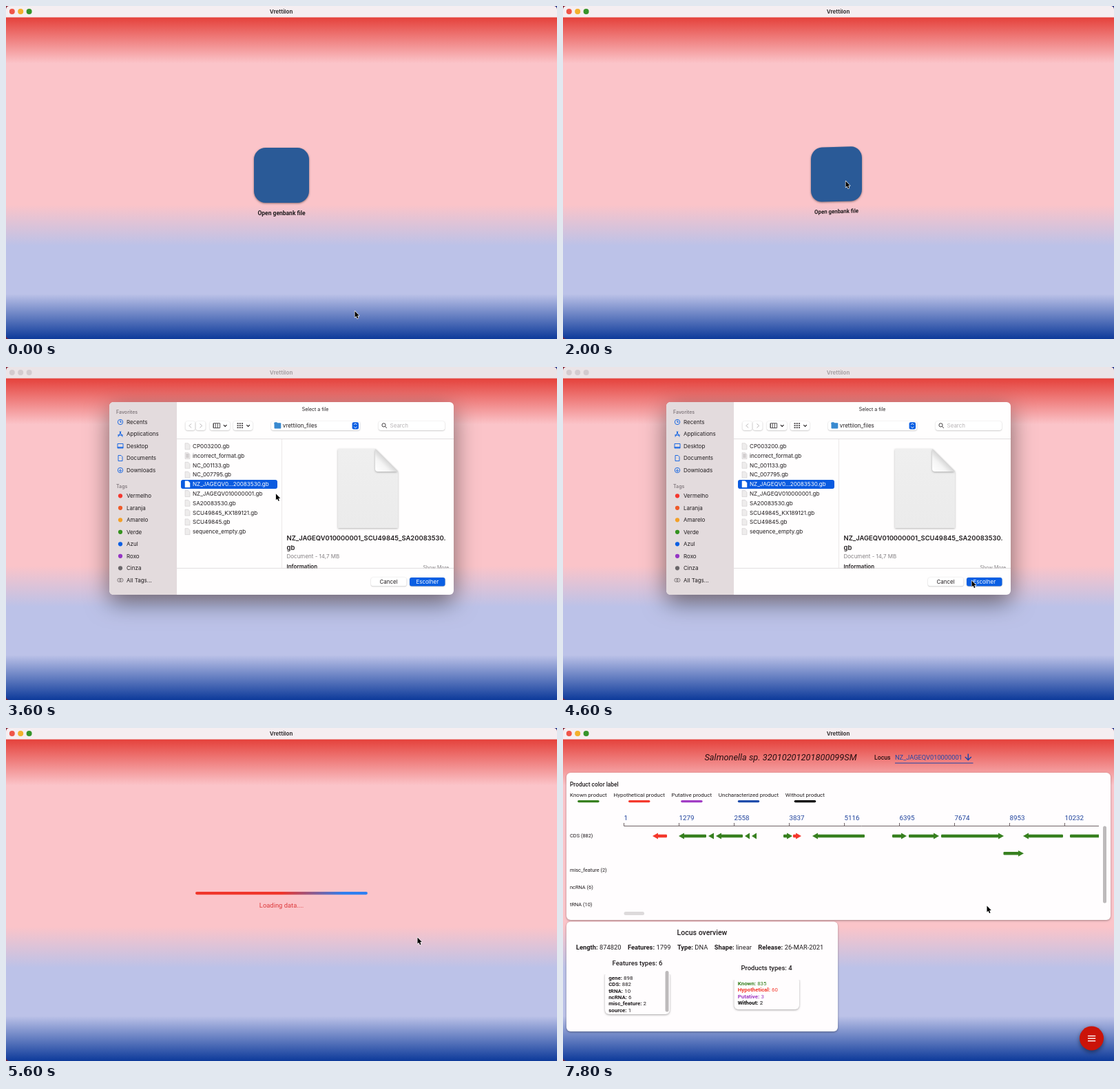
Write an HTML page with a canvas that moves like this. It is 800 px wide and 484 px high and loops after 8000 ms.

```html
<!DOCTYPE html>
<html lang="en">
<head>
<meta charset="utf-8">
<title>Vrettilon</title>
<style>
html, body { margin: 0; width: 100%; height: 100%; overflow: hidden; }
canvas { display: block; }
</style>
</head>
<body>
<canvas id="stage" width="800" height="484"></canvas>
<script>
const ctx = document.getElementById('stage').getContext('2d');
const LOOP = 8000, STEP = 200;
const SANS = 'Inter, sans-serif', ROBOTO = 'Roboto, sans-serif';
const RED = '#f4382c', GREEN = '#37801f', PURPLE = '#a13cc4', BLUE = '#1f4cab';
const INK = '#201c1e', ACCENT = '#0a5fe3', PAPER = '#fffdfe', BAR = '#bdbabb';

// ---- helpers ----
function text(s, x, y, size, color = INK, weight = 400, align = 'left', family = SANS) {
  ctx.font = `${weight} ${size}px ${family}`;
  ctx.fillStyle = color;
  ctx.textAlign = align;
  ctx.fillText(s, x, y + size * 0.36);
  return ctx.measureText(s).width;
}
const rob = (s, x, y, size, color, weight, align) => text(s, x, y, size, color, weight, align, ROBOTO);

// Bold label followed by its value; returns the total width.
function pair(label, value, x, y, size, color) {
  const w = rob(label + ':', x, y, size, color, 700) + size * 0.27;
  return w + rob(value, x + w, y, size, color);
}
function box(x, y, w, h, r, fill) {
  ctx.beginPath();
  ctx.roundRect(x, y, w, h, r);
  ctx.fillStyle = fill;
  ctx.fill();
}
function shadow(blur, dy, alpha, paint) {
  ctx.save();
  ctx.shadowColor = `rgba(0,0,0,${alpha})`;
  ctx.shadowBlur = blur;
  ctx.shadowOffsetY = dy;
  paint();
  ctx.restore();
}
const card = (x, y, w, h) => shadow(3, 1, 0.35, () => box(x, y, w, h, 6, PAPER));
const dot = (x, y, r, fill) => box(x - r, y - r, 2 * r, 2 * r, r, fill);

function stroke(color, width = 0.9) {
  ctx.strokeStyle = color;
  ctx.lineWidth = width;
  ctx.stroke();
}
function line(x0, y0, x1, y1, color, width = 1) {
  ctx.beginPath();
  ctx.moveTo(x0, y0);
  ctx.lineTo(x1, y1);
  stroke(color, width);
}
function ring(x, y, r, color, width) {
  ctx.beginPath();
  ctx.arc(x, y, r, 0, 7);
  stroke(color, width);
}
// A "v" turned clockwise by quarter turns.
function chevron(x, y, size, turns, color, width = 1) {
  ctx.save();
  ctx.translate(x, y);
  ctx.rotate(turns * Math.PI / 2);
  ctx.beginPath();
  ctx.moveTo(-size, -size / 2);
  ctx.lineTo(0, size / 2);
  ctx.lineTo(size, -size / 2);
  stroke(color, width);
  ctx.restore();
}
function downArrow(x, y, size, color, width) {
  line(x, y - size, x, y + size, color, width);
  chevron(x, y + size / 2, size, 0, color, width);
}
// Sheet of paper with its top right corner cut off.
function sheet(x, y, w, h, fold) {
  ctx.beginPath();
  ctx.moveTo(x, y);
  ctx.lineTo(x + w - fold, y);
  ctx.lineTo(x + w, y + fold);
  ctx.lineTo(x + w, y + h);
  ctx.lineTo(x, y + h);
  ctx.closePath();
}
function gradient(x0, y0, x1, y1, stops) {
  const g = ctx.createLinearGradient(x0, y0, x1, y1);
  for (const [at, c] of stops) g.addColorStop(at, c);
  return g;
}
const smooth = (a, b, t) => {
  const k = Math.min(1, Math.max(0, (t - a) / (b - a)));
  return k * k * (3 - 2 * k);
};

// ---- window ----
const backdrop = gradient(0, 17, 0, 484, [
  [0, '#e5423c'], [0.142, '#fbc4c9'], [0.582, '#fbc4c9'],
  [0.71, '#bcc2e8'], [0.86, '#bcc2e8'], [1, '#0d3a9a']]);
const desk = gradient(0, 0, 800, 0, [[0, '#7c2438'], [1, '#1c3c94']]);

function windowFrame(active) {
  ctx.fillStyle = desk;
  ctx.fillRect(0, 0, 800, 484);
  box(0, 0, 800, 484, 5, backdrop);
  box(0, 0, 800, 16.5, [5, 5, 0, 0], active ? '#f5eef1' : '#ebe4e7');
  ['#ef5548', '#f3b02b', '#36942a'].forEach((c, i) => dot(8.8 + i * 12.4, 8, 4, active ? c : '#d3cbcf'));
  text('Vrettilon', 399.5, 8, 8, active ? '#393436' : '#a9a2a5', 700, 'center');
}

// ---- start page ----
function startPage(tilt) {
  ctx.save();
  ctx.translate(360, 206);
  ctx.transform(1 - 0.075 * tilt, -0.026 * tilt, 0, 1 - 0.012 * tilt, 0, 0);
  shadow(3, 1, 0.45, () => box(0, 0, 80, 80, 17, '#2a5a97'));
  rob('Open genbank file', 40, 94.5, 8.5, INK, 700, 'center');
  ctx.restore();
}

// ---- file dialog ----
const files = ['CP003200.gb', 'incorrect_format.gb', 'NC_001133.gb', 'NC_007795.gb',
  'NZ_JAGEQV0...20083530.gb', 'NZ_JAGEQV010000001.gb', 'SA20083530.gb',
  'SCU49845_KX189121.gb', 'SCU49845.gb', 'sequence_empty.gb'];
const places = ['Recents', 'Applications', 'Desktop', 'Documents', 'Downloads'];
const tags = { Vermelho: '#f5372f', Laranja: '#ee5a2a', Amarelo: '#f3a027', Verde: '#35921f',
  Azul: ACCENT, Roxo: '#9535c4', Cinza: '#6a676a' };

const placeIcons = {
  Recents(x, y) {
    ring(x, y, 3.7, ACCENT);
    line(x, y - 2.5, x, y + 0.5, ACCENT);
    line(x, y, x + 2, y, ACCENT);
  },
  Applications(x, y) {
    for (const s of [-1, 1]) line(x - s, y - 4, x + s * 3.2, y + 4, ACCENT);
    line(x - 4, y + 1.5, x + 4, y + 1.5, ACCENT);
  },
  Desktop(x, y) {
    sheet(x - 4, y - 3.5, 8, 6.5, 0);
    stroke(ACCENT);
    line(x - 4, y + 1.8, x + 4, y + 1.8, ACCENT, 1.4);
  },
  Documents(x, y) {
    sheet(x - 3, y - 4, 6, 8, 2);
    stroke(ACCENT);
  },
  Downloads(x, y) {
    ring(x, y, 3.7, ACCENT);
    downArrow(x, y, 2, ACCENT, 0.9);
  }
};
function sidebar(active) {
  box(150, 51, 98, 280, [6, 0, 0, 6], active ? '#e3dbdd' : '#e8e1e3');
  ctx.globalAlpha = active ? 1 : 0.8;
  text('Favorites', 160, 65.3, 7, '#857c80', 600);
  text('Tags', 160, 173, 7, '#857c80', 600);
  const rows = (names, top, icon) => names.forEach((s, i) => {
    const y = top + i * 17.5;
    ctx.globalAlpha = active ? 1 : 0.35;
    icon(s, y);
    ctx.globalAlpha = active ? 1 : 0.5;
    text(s, 175, y, 8);
  });
  rows(places, 80, (s, y) => placeIcons[s](166, y));
  rows(Object.keys(tags), 187.3, (s, y) => dot(166, y, 3.1, tags[s]));
  rows(['All Tags...'], 309.8, (s, y) => [164.4, 167.4].forEach(x => ring(x, y, 2.6, '#6b6568', 0.8)));
  ctx.globalAlpha = 1;
}
function control(x, y, w, h, fill = '#fff') {
  shadow(1.6, 0.5, 0.3, () => box(x, y, w, h, 3, fill));
}
function toolbar(active) {
  text('Select a file', 449, 61.3, 7, INK, 400, 'center');
  const y = 85.4;
  for (const [x, w] of [[260.5, 14], [275.7, 14], [296, 29], [330, 28], [385, 129], [541, 96]])
    control(x, 79, w, 13);
  chevron(267.5, y, 3, 1, '#b5b1b3');
  chevron(283, y, 3, 3, '#b5b1b3');
  for (const x of [318.2, 351.6]) chevron(x, y - 0.2, 2.3, 0, INK, 1.1);
  sheet(301.2, 81.8, 9.4, 6.8, 0);
  stroke('#3d393b');
  for (let i = 0; i < 3; i++) {
    line(301.2 + i * 3.1, 82, 301.2 + i * 3.1, 88.6, '#3d393b', 0.9);
    for (let j = 0; j < 3; j++) box(335.5 + i * 3.2, 81.3 + j * 3, 2.2, 1.8, 0.4, '#4a4648');
  }
  box(389.5, 80.3, 4.5, 3, 1, '#3f8fd0');
  box(389.5, 81.3, 9.8, 8.2, 1, '#3889d0');
  text('vrettilon_files', 401.8, y, 8);
  if (active) box(502.6, 80.2, 9.4, 10.2, 2.2, ACCENT);
  chevron(507.3, y - 2.4, 2.1, 2, active ? '#fff' : INK);
  chevron(507.3, y + 2.3, 2.1, 0, active ? '#fff' : INK);
  ring(548.5, 84.4, 2.6, '#3d393b', 1);
  line(550.4, 86.3, 552.8, 88.8, '#3d393b');
  text('Search', 557.5, y, 8, '#b8b4b6');
}
function fileList(selected) {
  files.forEach((s, i) => {
    const y = 115.3 + i * 13.76, on = selected && i === 4;
    if (on) box(254, 164, 140, 13, 3, '#0a5be0');
    sheet(260, y - 4.5, 7, 9, 2.5);
    ctx.fillStyle = on ? '#fff' : '#eeecec';
    ctx.fill();
    stroke(on ? '#fff' : '#c6c3c5', 0.5);
    if (i === 1) for (const d of [-2, 0, 2]) line(261.3, y + d, 265.6, y + d, '#8d898b', 0.6);
    text(s, 271, y, 8.08, on ? '#fff' : INK);
  });
}
function preview() {
  shadow(3, 1, 0.3, () => {
    sheet(482, 119, 87, 115, 33);
    ctx.fillStyle = gradient(0, 119, 0, 234, [[0, '#efefef'], [1, '#ebebeb']]);
    ctx.fill();
    ctx.beginPath();
    ctx.moveTo(536, 119);
    ctx.lineTo(569, 152);
    ctx.arcTo(536, 152, 536, 119, 4);
    ctx.closePath();
    ctx.fillStyle = gradient(537, 151, 553, 135, [[0, '#fff'], [0.6, '#f4f4f4'], [1, '#d4d4d4']]);
    ctx.fill();
  });
  text('NZ_JAGEQV010000001_SCU49845_SA20083530.', 407.5, 249, 9.45, INK, 600);
  text('gb', 407.5, 263, 9.45, INK, 600);
  text('Document - 14,7 MB', 407.5, 275.6, 8, '#858184');
  ctx.save();
  ctx.beginPath();
  ctx.rect(401, 280, 248, 12.5);
  ctx.clip();
  text('Information', 407.5, 290.6, 8, INK, 600);
  text('Show More', 643, 291, 7, '#858184', 400, 'right');
  ctx.restore();
}
function dialog(active, selected, detail) {
  shadow(active ? 34 : 14, active ? 11 : 4, active ? 0.5 : 0.22, () => box(150, 51, 500, 280, 6, '#fffefe'));
  sidebar(active);
  toolbar(active);
  for (const y of [104.5, 292.5]) line(248, y, 650, y, '#e2dfe0');
  line(400.5, 105, 400.5, 292, '#ebe8e9');
  fileList(selected);
  if (detail) preview();
  control(530, 306, 51.5, 12.4);
  text('Cancel', 555.5, 312, 8, INK, 400, 'center');
  if (selected) control(586, 306, 51.5, 12.4, ACCENT);
  text('Escolher', 611.8, 312, 8, selected ? '#fff' : '#bdbabb', 400, 'center');
}

// ---- loading ----
function loading() {
  box(275, 238, 250, 4.2, 2.1, gradient(275, 0, 525, 0,
    [[0, '#f0362b'], [0.5, '#f0362b'], [0.86, '#2f7fee'], [1, '#2f80f2']]));
  rob('Loading data....', 400, 257.8, 9.4, '#dd393b', 400, 'center');
}

// ---- genome page ----
const legend = { Known: GREEN, Hypothetical: RED, Putative: PURPLE, Uncharacterized: BLUE, Without: '#000' };

function gene(x, length, y, dir, color) {
  const head = Math.min(8, length), tip = dir > 0 ? x + length : x, neck = tip - dir * head;
  ctx.beginPath();
  ctx.moveTo(tip, y);
  ctx.lineTo(neck, y - 4.4);
  ctx.lineTo(neck, y + 4.4);
  ctx.fillStyle = color;
  ctx.fill();
  if (length > 9) box(dir > 0 ? x : neck - 0.5, y - 2.2, length - head + 0.5, 4.4, 1.2, color);
}
// Neighbouring genes on one strand, a small gap apart.
function operon(x, dir, lengths, color = GREEN, y = 157) {
  for (const n of lengths) {
    gene(x, n, y, dir, color);
    x += n + 3;
  }
}
function genes() {
  ctx.save();
  ctx.beginPath();
  ctx.rect(88, 143, 690, 120);
  ctx.clip();
  operon(130, -1, [21], RED);
  operon(168, -1, [40, 8, 39, 7, 7]);
  operon(320, 1, [13]);
  operon(334, 1, [12], RED);
  operon(362, -1, [76]);
  operon(478, 1, [21, 44, 91]);
  operon(639.5, 1, [29.5], GREEN, 182.3);
  operon(668, -1, [58]);
  operon(736, 1, [100]);
  ctx.restore();
}
function genomeTrack() {
  card(5, 65, 790, 214);
  rob('Product color label', 10, 81.5, 8.4, INK, 500);
  let x = 10;
  for (const name in legend) {
    const w = rob(name + ' product', x, 97.5, 8);
    box(x + w / 2 - 15.7, 105, 31.5, 3.2, 1.6, legend[name]);
    x += w + 9.8;
  }
  line(88.5, 142.5, 778, 142.5, '#6e6265');
  for (let i = 0; i < 9; i++) {
    const tick = 88.5 + i * 80;
    line(tick, 138, tick, 142.5, '#6e6265');
    rob(i * 1279 || 1, tick, 130, 9.8, '#1f429c');
  }
  genes();
  ['CDS (882)', '', 'misc_feature (2)', 'ncRNA (6)', 'tRNA (10)']
    .forEach((s, i) => rob(s, 10, 156.3 + i * 25, 7.4));
  box(784, 142.5, 5, 112, 2.5, BAR);
  box(88.5, 267, 29.5, 5, 2.5, '#dddadb');
}
// Scrollable list whose top edge casts no shadow.
function listCard(x, y, w, h, counts, colors = {}) {
  card(x, y, w, h);
  box(x - 2, y - 4, w + 4, 8, 0, PAPER);
  Object.entries(counts).forEach(([name, n], i) =>
    pair(name, n, x + 5.2, y + 9.1 + i * 9.35, 7.9, colors[name]));
}
function overview() {
  card(5, 281.5, 394, 159.5);
  rob('Locus overview', 202, 297.3, 10.5, INK, 500, 'center');
  const facts = { Length: '874820', Features: '1799', Type: 'DNA', Shape: 'linear', Release: '26-MAR-2021' };
  let x = 19;
  for (const name in facts) x += pair(name, facts[name], x, 318.3, 9.3) + 9.5;
  rob('Features types: 6', 108, 341.5, 9.5, INK, 500, 'center');
  rob('Products types: 4', 295.5, 349, 9.5, INK, 500, 'center');
  listCard(61, 354, 94, 62, { gene: 898, CDS: 882, tRNA: 10, ncRNA: 6, misc_feature: 2, source: 1 });
  box(148.5, 353, 5, 59.5, 2.5, BAR);
  listCard(248.5, 362, 94.5, 47, { Known: 835, Hypothetical: 60, Putative: 3, Without: 2 }, legend);
}
function genomePage() {
  rob('Salmonella sp. 32010201201800099SM', 316, 42.8, 12.8, '#260d0f', 'italic 400', 'center');
  rob('Locus', 452, 42.5, 8.7, '#260d0f', 500);
  rob('NZ_JAGEQV010000001', 482, 42.8, 9.25, '#2145a6');
  downArrow(588.3, 42, 4.5, '#2145a6', 1.5);
  line(482, 51, 595.5, 51, '#2145a6', 1.2);
  genomeTrack();
  overview();
  shadow(6, 2.5, 0.45, () => dot(767.5, 451, 17.5, '#cb1409'));
  for (const d of [-3.6, 0, 3.6]) line(762, 451.2 + d, 773.2, 451.2 + d, '#fff', 1.4);
}

// ---- pointer ----
// Each move: leave, arrive, x, y
const moves = [[400, 1400, 410, 254], [2200, 2800, 368, 169], [3400, 4400, 593, 310],
  [5000, 5600, 597, 304], [5600, 6000, 615, 258]];
const arrow = new Path2D('M.5 .5V9.6L2.5 7.8 4 11.2 5.5 10.5 4.1 7.3 6.8 7.1Z');

function pointer(t) {
  let x = 506, y = 443;
  for (const [leave, arrive, toX, toY] of moves) {
    const k = smooth(leave, arrive, t);
    x += (toX - x) * k;
    y += (toY - y) * k;
  }
  ctx.save();
  ctx.translate(x, y);
  ctx.lineJoin = 'round';
  ctx.lineWidth = 1.3;
  ctx.strokeStyle = '#fff';
  ctx.stroke(arrow);
  ctx.fillStyle = '#000';
  ctx.fill(arrow);
  ctx.restore();
}

function draw(t) {
  const open = t >= 2600 && t < 5200, key = open && t >= 3000;
  windowFrame(!key);
  if (t < 5200) startPage(smooth(1000, 1800, t));
  else if (t < 7400) loading();
  else genomePage();
  if (open) dialog(key, t >= 3400, t >= 3600);
  pointer(t);
}

const begin = performance.now();
function tick() {
  const t = (performance.now() - begin) % LOOP;
  draw(Math.floor(t / STEP) * STEP);
  requestAnimationFrame(tick);
}
tick();
</script>
</body>
</html>
```
